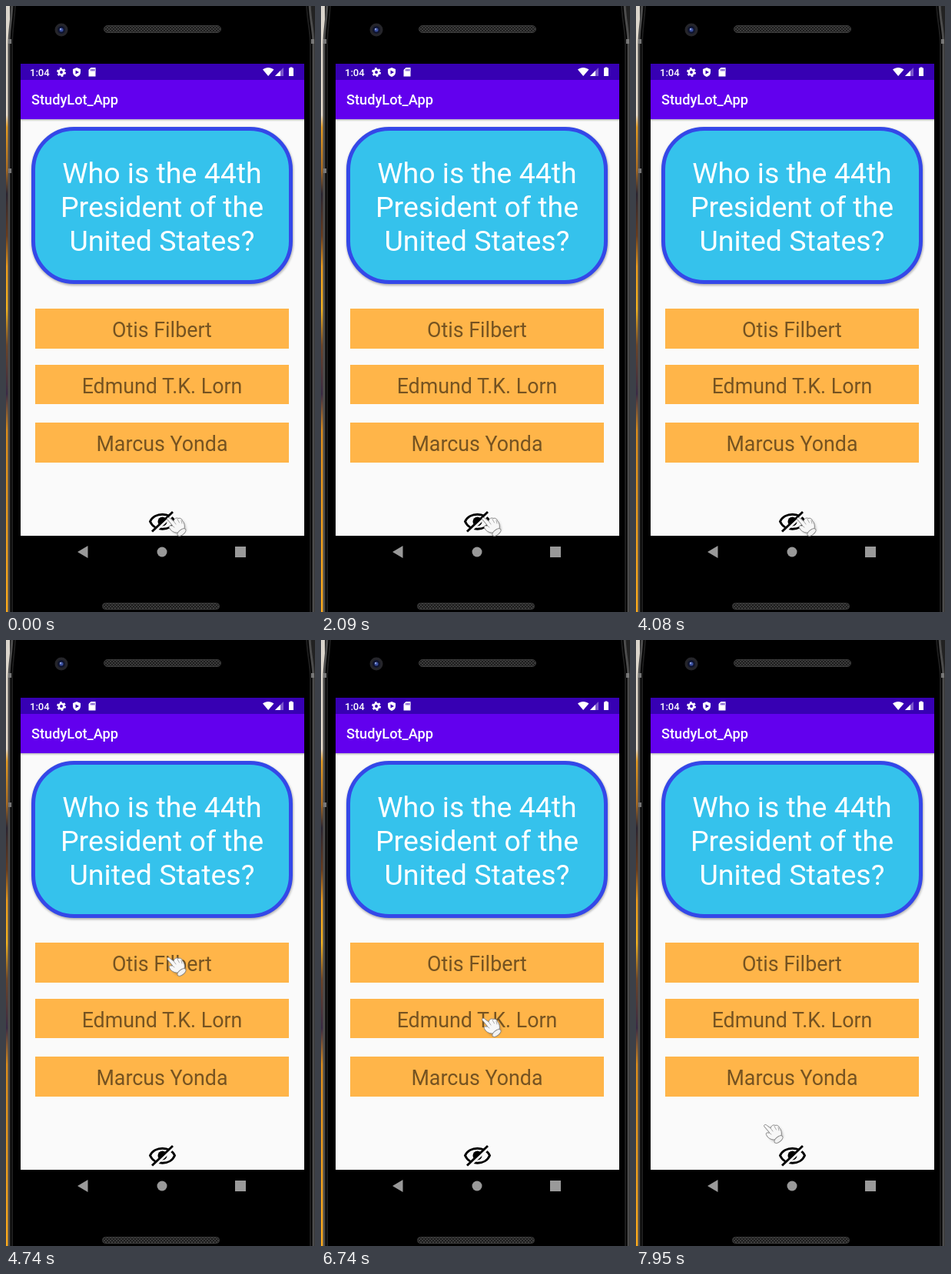
An HTML page that plays this animation: 402x787 px, repeating every 8000 ms.

```html
<!DOCTYPE html>
<html lang="en">
<head>
<meta charset="utf-8">
<title>Flash card quiz</title>
<style>
  html, body { margin: 0; width: 100%; height: 100%; overflow: hidden; background: #000; }
  svg { display: block; width: 402px; height: 787px; }
  text { font-family: Roboto, sans-serif; }
  .question { font-size: 37.5px; fill: #fff; text-anchor: middle; }
  .answer text { font-size: 26.8px; fill: #000; fill-opacity: .54; text-anchor: middle; }
</style>
</head>
<body>
<svg viewBox="0 0 402 787">
  <defs>
    <linearGradient id="backdrop" x2="0" y2="1">
      <stop offset="0" stop-color="#d9d4cc"/>
      <stop offset=".18" stop-color="#e8dccb"/>
      <stop offset=".2" stop-color="#e39a22"/>
      <stop offset=".27" stop-color="#a86a22"/>
      <stop offset=".31" stop-color="#2a2430"/>
      <stop offset=".38" stop-color="#6a3c1c"/>
      <stop offset=".43" stop-color="#eb9a1c"/>
      <stop offset=".5" stop-color="#f0b020"/>
      <stop offset=".56" stop-color="#6d4426"/>
      <stop offset=".64" stop-color="#3a2a44"/>
      <stop offset=".7" stop-color="#d88a1c"/>
      <stop offset="1" stop-color="#f8a81c"/>
    </linearGradient>
    <linearGradient id="barShadow" x2="0" y2="1">
      <stop stop-color="#bbb"/>
      <stop offset="1" stop-color="#fafafa"/>
    </linearGradient>
    <filter id="soft" x="-10%" y="-10%" width="120%" height="125%">
      <feGaussianBlur stdDeviation="1.6"/>
    </filter>
    <pattern id="mesh" width="4" height="4" patternUnits="userSpaceOnUse">
      <rect width="4" height="4" fill="#1c1c1c"/>
      <path d="M0 4L4 0M0 0L4 4" stroke="#444" stroke-width=".8"/>
    </pattern>
  </defs>

  <!-- Phone body -->
  <rect width="402" height="787" fill="#222"/>
  <rect width="5" height="787" fill="url(#backdrop)"/>
  <path d="M8 -2C7 20 4 32 4 50V790H400V50C400 32 396 20 395 -2Z" fill="#000" stroke="#4c4c4c" stroke-width="3"/>
  <path d="M12 -2C11 20 8 32 8 50V790M391 -2C392 20 396 32 396 50V790" fill="none" stroke="#1d1d1d" stroke-width="2"/>
  <path d="M3 46H7M3 214H7M397 46H401" stroke="#777" stroke-width="6"/>
  <circle cx="72" cy="31" r="8.5" fill="#25252a"/>
  <circle cx="72" cy="31" r="5" fill="#10152e"/>
  <circle cx="72" cy="31" r="2.5" fill="#3b50a0"/>
  <circle cx="71" cy="30" r="1" fill="#a8b8ee"/>
  <g fill="url(#mesh)" stroke="#3b3b3b">
    <rect x="127.5" y="25.5" width="152" height="9" rx="4.5"/>
    <rect x="125.5" y="775.5" width="152" height="8" rx="4"/>
  </g>

  <!-- Screen and bars -->
  <path d="M19 75H388V688H19Z" fill="#fafafa"/>
  <path d="M19 147H388V150H19Z" fill="url(#barShadow)"/>
  <path d="M19 96H388V147H19Z" fill="#6200ee"/>
  <path d="M19 75H388V96H19Z" fill="#3700b3"/>
  <g fill="#fff">
    <text x="31" y="90.5" font-size="13" font-weight="500">1:04</text>
    <text x="33" y="128" font-size="18.2" font-weight="500">StudyLot_App</text>
    <circle cx="72" cy="86" r="3.2" fill="none" stroke="#fff" stroke-width="2.6"/>
    <circle cx="72" cy="86" r="5" fill="none" stroke="#fff" stroke-width="2" stroke-dasharray="2.6 2.636"/>
    <path d="M92 80L97 82V86C97 89 95 91 92 92C89 91 87 89 87 86V82Z"/>
    <path d="M90.5 83.5L95 86L90.5 88.5Z" fill="#3700b3"/>
    <path d="M110.5 80H116.5V91.5H107.5V83Z"/>
    <path d="M110.8 82V84.5M112.7 82V84.5M114.6 82V84.5" stroke="#3700b3"/>
    <path d="M334 82.5C338 79 344 79 348.500 82.500L341.200 91Z"/>
    <path d="M361 80V91H350Z" opacity=".35"/>
    <path d="M357 84V91H350Z"/>
    <path d="M369.500 79.500H372.500V80.500H374V91H368V80.500H369.500Z"/>
  </g>

  <!-- Question card -->
  <rect x="33" y="158" width="341" height="205" rx="56" fill="#000" opacity=".3" filter="url(#soft)"/>
  <rect x="35.5" y="159.5" width="335" height="199" rx="53" fill="#35c2ec" stroke="#3448e8" stroke-width="5"/>
  <g class="question">
    <text x="203" y="230">Who is the 44th</text>
    <text x="203" y="274">President of the</text>
    <text x="203" y="318">United States?</text>
  </g>

  <g id="answers"></g>

  <!-- Visibility toggle -->
  <g fill="none" stroke="#000" stroke-width="3">
    <path d="M187.500 669.500C193 657 214 657 219.500 669.500C214 682.500 193 682.500 187.500 669.500Z"/>
    <circle cx="203.500" cy="669.500" r="6" fill="#000" stroke="none"/>
    <g id="slash">
      <path d="M190.500 685L220 657" stroke="#fafafa" stroke-width="4"/>
      <path d="M190 682.500L217 657"/>
    </g>
  </g>

  <!-- Navigation bar -->
  <path d="M19 688H388V740H19Z" fill="#000"/>
  <g fill="#999">
    <path d="M93 709L106.500 701V717Z"/>
    <circle cx="203" cy="709" r="6.500"/>
    <path d="M298 702H312V716H298Z"/>
  </g>

  <!-- Glove pointer -->
  <g id="hand" stroke="#858585" stroke-linejoin="round" stroke-linecap="round">
    <path d="M3 5L10 12L5 14C8 20 13 24 18 25L27 18C26 10 24 6 20 4Z" fill="#000" stroke="none" opacity=".2" filter="url(#soft)"/>
    <path d="M1.500 3C1.500 1 4 .8 5.500 2.500L10 6C11 2.500 14 1 16 2.500C18.500 1.500 21 3 21.500 5.500C24 8 25 12 24 16L16 21C10 21.500 6 18 4.500 14.500C3.500 12.500 5 11.500 7 12L8.500 12Z" fill="#f7f7f7"/>
    <path d="M10 6L13 10M15 3.500L17.500 8M20 5L21 9M8.500 12L11 14" fill="none" stroke="#aaa"/>
    <ellipse cx="20.500" cy="20.500" rx="6.500" ry="3.300" transform="rotate(-38 20.500 20.500)" fill="#f2f2f2"/>
  </g>
</svg>
<script>
const LOOP = 8000;
const AMBER = '#ffb549', RED = '#f44336', GREEN = '#4caf50';
const $ = id => document.getElementById(id);

const answers = [
  { name: 'Otis Filbert', y: 393, h: 52 },
  { name: 'Edmund T.K. Lorn', y: 466, h: 51 },
  { name: 'Marcus Yonda', y: 541, h: 52 }
];
$('answers').innerHTML = answers.map(({ name, y, h }) =>
  `<g class="answer"><rect x="38" y="${y}" width="330" height="${h}"/>
   <text x="203" y="${y + 37}">${name}</text></g>`).join('');
const boxes = document.querySelectorAll('.answer rect');

const handPath = [
  [0, 208, 663], [4200, 208, 640], [4320, 208, 589], [4470, 208, 490],
  [4590, 208, 422], [4740, 208, 411], [5050, 208, 483], [5200, 208, 563],
  [5350, 208, 591], [5500, 208, 606], [5620, 208, 611], [6110, 208, 594],
  [6230, 208, 560], [6350, 208, 530], [6500, 208, 508], [6620, 208, 495],
  [6740, 208, 490], [7010, 208, 513], [7160, 189, 575], [7280, 168, 623],
  [7430, 164, 632], [7950, 165, 628]
];

// [time, answers visible, index of the wrong pick]
const states = [
  [0, true], [840, false], [2090, true], [3090, false], [4080, true],
  [5050, true, 0], [5990, true], [6890, true, 1], [7830, true]
];

const at = (list, t) => list.findLast(([start]) => start <= t);

function draw(now) {
  const t = now % LOOP;
  const [, x, y] = at(handPath, t);
  const [, shown, wrong] = at(states, t);
  $('hand').setAttribute('transform', `translate(${x} ${y})`);
  $('answers').style.display = $('slash').style.display = shown ? '' : 'none';
  boxes.forEach((box, i) => {
    const color = wrong === undefined ? AMBER : i === wrong ? RED : i === 2 ? GREEN : AMBER;
    box.setAttribute('fill', color);
  });
}

const begin = performance.now();
function tick() {
  draw(performance.now() - begin);
  requestAnimationFrame(tick);
}
tick();
</script>
</body>
</html>
```
